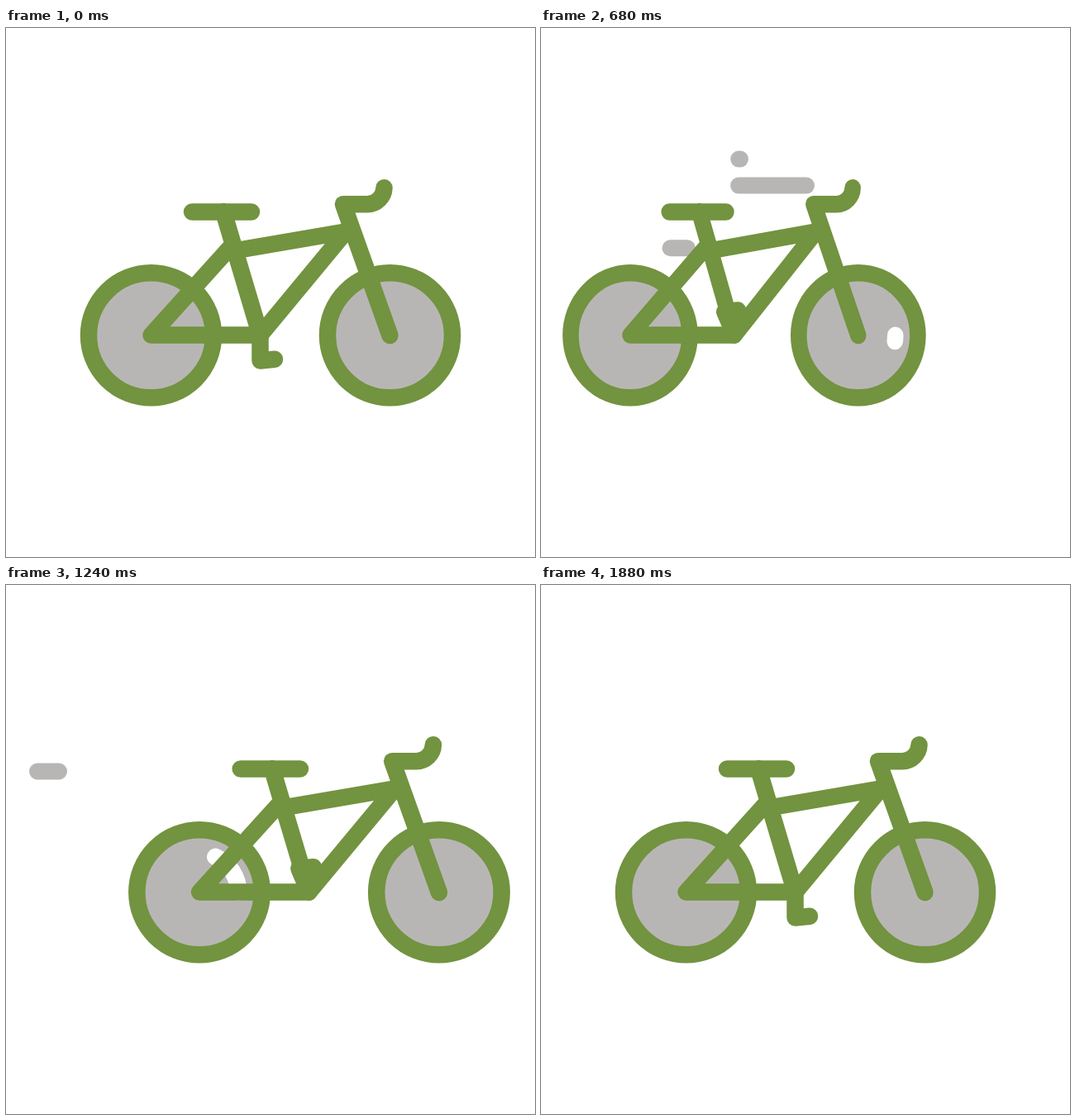
Write an HTML page with a canvas that moves like this. It is 640x640 px and loops after 2000 ms.

```html
<!DOCTYPE html>
<html lang="en">
<head>
<meta charset="utf-8">
<title>Bicycle</title>
<style>
  html, body { margin: 0; width: 100%; height: 100%; overflow: hidden; background: #fff; }
  canvas { display: block; width: 640px; height: 640px; }
</style>
</head>
<body>
<canvas id="stage" width="640" height="640"></canvas>
<script>
const ctx = document.getElementById('stage').getContext('2d');
const GREEN = '#72933f', GREY = '#b8b6b5', WHITE = '#fff';
const LOOP = 2000, STEP = 40, AXLE_Y = 371.8;

// Ride keys: time, shift in x, horizontal scale
const RIDE = [[200, 0, 1], [720, -75, 0.954], [1240, 59, 1.003], [1880, 0, 1]];

// Streaks grow from their start, then their tail catches up
const GROW = 388, SHRINK = 300, TAIL_DELAY = 288;
const WIND = [
  { y: 158.6, from: 241, to: 102, at: 654 },
  { y: 190.6, from: 321, to: 95, at: 522 },
  { y: 225.5, from: 177, to: 38, at: 735 },
  { y: 266.2, from: 177, to: 38, at: 586 }
];
const WHEELS = [{ x: 175.5, at: 734 }, { x: 464.5, at: 644 }];

const FRAME = new Path2D(
  'M225 222.5H297 M263 222L307.5 371.5H175.5L273 263.5 M276 269.5L416 245.5 ' +
  'M307.5 371.5L411 246.5 M464.5 372L408 213.2H437A20.5 20.5 0 0 0 457.5 193.2');

const clamp = v => Math.min(1, Math.max(0, v));
const mix = (a, b, k) => a + (b - a) * k;
const smooth = p => p * p * (3 - 2 * p);
const span = (t, start, length) => smooth(clamp((t - start) / length));

// cubic-bezier(.2, 0, .6, 1)
function swing(p) {
  let lo = 0, hi = 1;
  for (let i = 0; i < 24; i++) {
    const s = (lo + hi) / 2, r = 1 - s;
    const x = 0.6 * r * r * s + 1.8 * r * s * s + s * s * s;
    if (x < p) lo = s; else hi = s;
  }
  return smooth((lo + hi) / 2);
}

function ride(t) {
  let i = 0;
  while (i < RIDE.length - 2 && t >= RIDE[i + 1][0]) i++;
  const [a, b] = [RIDE[i], RIDE[i + 1]];
  const k = swing(clamp((t - a[0]) / (b[0] - a[0])));
  return [mix(a[1], b[1], k), mix(a[2], b[2], k)];
}

const trim = (t, at) => [span(t, at + TAIL_DELAY, SHRINK), span(t, at, GROW)];

function stroke(color, width, path) {
  ctx.strokeStyle = color;
  ctx.lineWidth = width;
  if (path) ctx.stroke(path); else ctx.stroke();
}

function drawWind(t) {
  for (const { y, from, to, at } of WIND) {
    const [tail, head] = trim(t, at);
    if (head - tail < 0.002) continue;
    ctx.beginPath();
    ctx.moveTo(mix(from, to, tail), y);
    ctx.lineTo(mix(from, to, head), y);
    stroke(GREY, 20);
  }
}

function drawWheel(t, { x, at }) {
  ctx.beginPath();
  ctx.arc(x, AXLE_Y, 75.5, 0, 2 * Math.PI);
  ctx.fillStyle = GREY;
  ctx.fill();
  stroke(GREEN, 20.5);
  const [tail, head] = trim(t, at);
  if (head - tail < 0.002) return;
  ctx.beginPath();
  ctx.arc(x, AXLE_Y, 47, tail * 2 * Math.PI, head * 2 * Math.PI);
  stroke(WHITE, 20.5);
}

function drawCrank(t) {
  const a = span(t, 200, 1600) * 4 * Math.PI;
  const x = 307.5 - 31 * Math.sin(a), y = 371.5 + 31 * Math.cos(a);
  ctx.beginPath();
  ctx.moveTo(307.5, 371.5);
  ctx.lineTo(x, y);
  ctx.lineTo(x + 17.5, y - 1.8);
  stroke(GREEN, 20.5);
}

function draw(t) {
  ctx.setTransform(1, 0, 0, 1, 0, 0);
  ctx.fillStyle = WHITE;
  ctx.fillRect(0, 0, 640, 640);
  ctx.lineCap = ctx.lineJoin = 'round';
  drawWind(t);
  const [shift, scale] = ride(t);
  ctx.translate(320 + shift, 0);
  ctx.scale(scale, 1);
  ctx.translate(-320, 0);
  WHEELS.forEach(w => drawWheel(t, w));
  stroke(GREEN, 20.5, FRAME);
  drawCrank(t);
}

const begin = performance.now();
function tick() {
  const t = (performance.now() - begin) % LOOP;
  draw(Math.floor(t / STEP) * STEP);
  requestAnimationFrame(tick);
}
tick();
</script>
</body>
</html>
```
